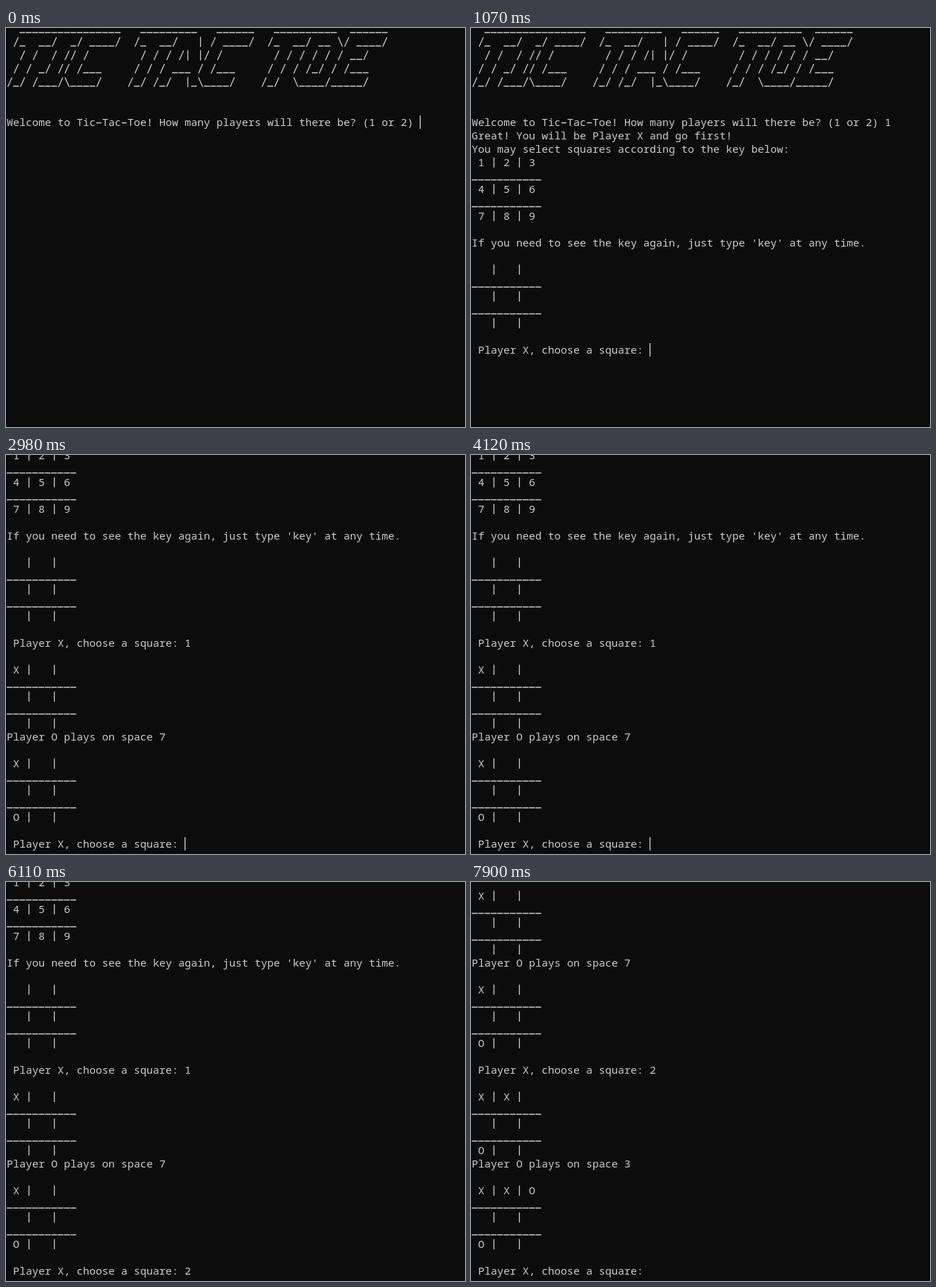
An HTML page with a canvas that plays this animation: 650x566 px, repeating every 8 s.

```html
<!DOCTYPE html>
<html lang="en">
<head>
<meta charset="utf-8">
<title>Tic-Tac-Toe terminal</title>
<style>
  html, body { margin: 0; width: 100%; height: 100%; overflow: hidden; background: #0c0c0c; }
  canvas { display: block; }
</style>
</head>
<body>
<canvas id="terminal" width="650" height="566"></canvas>
<script>
const ctx = document.getElementById('terminal').getContext('2d');
const CELL = 9, LINE = 19, LEFT = 1, TOP = -9, BASELINE = 15, ROWS = 30;
const LOOP = 8000;

const banner = String.raw`
  ________________   _________   ______   __________  ______
 /_  __/  _/ ____/  /_  __/   | / ____/  /_  __/ __ \/ ____/
  / /  / // /        / / / /| |/ /        / / / / / / __/
 / / _/ // /___     / / / ___ / /___     / / / /_/ / /___
/_/ /___/\____/    /_/ /_/  |_\____/    /_/  \____/_____/`.split('\n').slice(1);

const board = cells => [0, 3, 6]
  .map(i => ' ' + [...cells.slice(i, i + 3)].join(' | '))
  .join('\n' + '_'.repeat(11) + '\n').split('\n');

const question = 'Welcome to Tic-Tac-Toe! How many players will there be? (1 or 2) ';
const prompt = ' Player X, choose a square: ';

const turn = (pick, afterX, reply, afterO) => [
  prompt + pick, '', ...board(afterX),
  'Player O plays on space ' + reply, '', ...board(afterO), ''
];

const welcome = [...banner, '', ''];
const intro = [
  ...welcome, question + '1',
  'Great! You will be Player X and go first!',
  'You may select squares according to the key below:',
  ...board('123456789'), '',
  "If you need to see the key again, just type 'key' at any time.", '',
  ...board(' '.repeat(9)), ''
];
const firstTurn = [...intro, ...turn(1, 'X        ', 7, 'X     O  ')];
const secondTurn = [...firstTurn, ...turn(2, 'XX    O  ', 3, 'XXO   O  ')];

// start time, finished lines, input line, cursor visible
const steps = [
  [0, welcome, question, true],
  [70, welcome, question + '1', true],
  [660, welcome, question + '1', false],
  [1070, intro, prompt, true],
  [1600, intro, prompt, false],
  [2190, intro, prompt, true],
  [2720, intro, prompt + '1', true],
  [2980, firstTurn, prompt, true],
  [3570, firstTurn, prompt, false],
  [4120, firstTurn, prompt, true],
  [4720, firstTurn, prompt, false],
  [5250, firstTurn, prompt, true],
  [5510, firstTurn, prompt + '2', true],
  [6110, firstTurn, prompt + '2', false],
  [6180, secondTurn, prompt, true],
  [6770, secondTurn, prompt, false],
  [7300, secondTurn, prompt, true],
  [7900, secondTurn, prompt, false]
];

// Line-art characters as strokes inside one cell: x1, y1, x2, y2
const strokes = {
  '/': [1.5, 16.5, 7.5, 3],
  '\\': [1.5, 3, 7.5, 16.5],
  '|': [4.5, 2.5, 4.5, 17],
  '_': [0.2, 15.5, 8.4, 15.5],
  '-': [1, 10.5, 8, 10.5]
};

function drawLine(text, y) {
  ctx.fillText(text.replace(/[\/\\|_-]/g, ' '), LEFT, y + BASELINE);
  ctx.beginPath();
  [...text].forEach((char, col) => {
    if (!strokes[char]) return;
    const [x1, y1, x2, y2] = strokes[char], x = LEFT + col * CELL;
    ctx.moveTo(x + x1, y + y1);
    ctx.lineTo(x + x2, y + y2);
  });
  ctx.stroke();
}

function draw([, lines, input, cursor]) {
  ctx.fillStyle = '#0c0c0c';
  ctx.fillRect(0, 0, 650, 566);
  ctx.font = '15px "Noto Sans Mono", "DejaVu Sans Mono", monospace';
  ctx.fillStyle = ctx.strokeStyle = '#cccccc';
  ctx.lineWidth = 1.3;
  const visible = [...lines, input].slice(-ROWS);
  visible.forEach((text, row) => drawLine(text, TOP + row * LINE));
  if (cursor) {
    ctx.fillStyle = '#ffffff';
    ctx.fillRect(LEFT + input.length * CELL, TOP + (visible.length - 1) * LINE, 1, LINE);
  }
}

let shown;
function tick() {
  const time = performance.now() % LOOP;
  const step = steps.findLast(([start]) => start <= time);
  if (step !== shown) draw(shown = step);
  requestAnimationFrame(tick);
}
tick();
</script>
</body>
</html>
```
